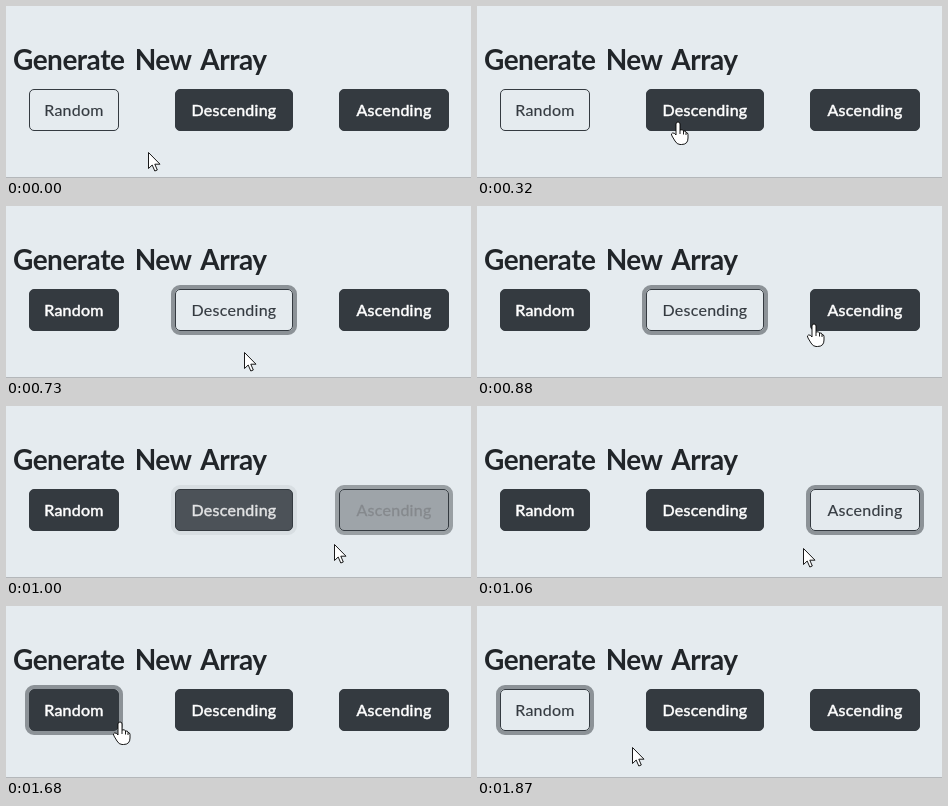
An HTML page for the animation above (2.33 s loop, 465 by 172 pixels).

```html
<!DOCTYPE html>
<html lang="en">
<head>
<meta charset="utf-8">
<title>Generate New Array</title>
<style>
  html, body { margin: 0; width: 100%; height: 100%; overflow: hidden; background: #e5ebef; }
  svg { display: block; width: 465px; height: 172px; }
  text { font-family: Lato, sans-serif; }
  .heading { font-size: 28px; font-weight: 700; letter-spacing: -.5px; word-spacing: 4px; fill: #212529; }
  .label { font-size: 16px; letter-spacing: .25px; text-anchor: middle; }
  .face { stroke: #343a40; }
  .ring { fill: none; stroke: #343a40; stroke-width: 4; }
  .cursor path { fill: #fff; stroke: #000; stroke-width: .9; stroke-linejoin: round; }
  .cursor .knuckles { fill: none; }
</style>
</head>
<body>
<svg viewBox="0 0 465 172">
  <rect y="171" width="465" height="1" fill="#b4b7ba"/>
  <text class="heading" x="7" y="64">Generate New Array</text>
  <g id="buttons"></g>
  <g id="cursor" class="cursor">
    <path id="arrow" d="M.5 .5V16.5L4.2 13L6.8 19L9.3 18L6.8 12.2H12Z"/>
    <g id="hand">
      <path d="M-2 12V1Q-2 -1 0 -1T2 1V7Q5 6 5.5 8Q8 7.5 8 9.5Q10 9.5 10 11.5V15Q10 21.5 3.5 21.5H2Q-1 21.5 -3 18L-6 13Q-7.5 10.5 -5.5 10T-2 12Z"/>
      <path class="knuckles" d="M2 7V11M5.5 8V11.5M8 9.5V12"/>
    </g>
  </g>
</svg>
<script>
const LOOP = 2330, STEP = 30, FADE = 150;
const DARK = [52, 58, 64], PAGE = [229, 235, 239], WHITE = [255, 255, 255];
const $ = id => document.getElementById(id);

// Each button is visited once: the cursor sets off, clicks at spot, leaves and comes to rest.
const home = [142, 146];
const visits = [
  { label: 'Descending', x: 169, w: 118, start: 170, click: 320, leave: 385, end: 560, spot: [201, 117], rest: [218, 147] },
  { label: 'Ascending', x: 333, w: 110, start: 700, click: 885, leave: 915, end: 1060, spot: [340, 117], rest: [326, 142] },
  { label: 'Random', x: 23, w: 90, start: 1290, click: 1530, leave: 1710, end: 1870, spot: [114, 117], rest: [155, 141] }
];

const clamp = v => Math.min(1, Math.max(0, v));
const lerp = (a, b, k) => a + (b - a) * k;
const progress = (t, from, to) => clamp((t - from) / (to - from));
const mix = (a, b, k) => `rgb(${a.map((v, i) => Math.round(lerp(v, b[i], k)))})`;

function fade(t, from) {
  const k = progress(t, from, from + FADE);
  return k * k * (3 - 2 * k);
}

function add(tag, attrs) {
  const node = document.createElementNS('http://www.w3.org/2000/svg', tag);
  for (const key in attrs) node.setAttribute(key, attrs[key]);
  return $('buttons').appendChild(node);
}

visits.forEach((v, i) => {
  v.from = i ? visits[i - 1].rest : home;
  v.next = i + 1 < visits.length ? visits[i + 1].click : LOOP;
  v.halo = add('rect', { class: 'ring', x: v.x - 2, y: 81, width: v.w + 4, height: 46, rx: 7 });
  v.face = add('rect', { class: 'face', x: v.x + .5, y: 83.5, width: v.w - 1, height: 41, rx: 4.5 });
  v.text = add('text', { class: 'label', x: v.x + v.w / 2, y: 110 });
  v.text.textContent = v.label;
});

// The picture advances in steps and stands still between visits.
function heldTime(t) {
  const visit = visits.findLast(v => t >= v.start);
  if (!visit) return 0;
  const steps = Math.floor((t - visit.start) / STEP);
  return Math.min(visit.end, visit.start + steps * STEP);
}

function cursorAt(t) {
  const { from, spot, rest, start, click, leave, end } = visits.findLast(v => t >= v.start) || visits[0];
  const near = progress(t, start, click);
  const away = 1 - (1 - progress(t, leave, end)) ** 2;
  const x = lerp(lerp(from[0], spot[0], near), rest[0], away);
  const y = lerp(lerp(from[1], spot[1], near * near), rest[1], away);
  return [Math.round(x), Math.round(y)];
}

function draw(t) {
  const firstClick = visits[0].click;
  for (const v of visits) {
    const selectedBefore = v === visits.at(-1) ? 1 - fade(t, firstClick) : 0;
    const light = selectedBefore + fade(t, v.leave) - fade(t, v.next);
    const ink = mix(WHITE, DARK, light);
    v.halo.style.opacity = (fade(t, v.click) - fade(t, v.next)) / 2;
    v.face.style.fill = mix(DARK, PAGE, light);
    Object.assign(v.text.style, { fill: ink, stroke: ink, strokeWidth: lerp(.5, .15, light) });
  }
  const [x, y] = cursorAt(t);
  const over = y >= 83 && y < 125 && visits.some(v => x >= v.x && x <= v.x + v.w + 1);
  $('cursor').setAttribute('transform', `translate(${x} ${y})`);
  $('arrow').style.display = over ? 'none' : '';
  $('hand').style.display = over ? '' : 'none';
}

const origin = performance.now();
function tick() {
  draw(heldTime((performance.now() - origin) % LOOP));
  requestAnimationFrame(tick);
}
tick();
</script>
</body>
</html>
```
